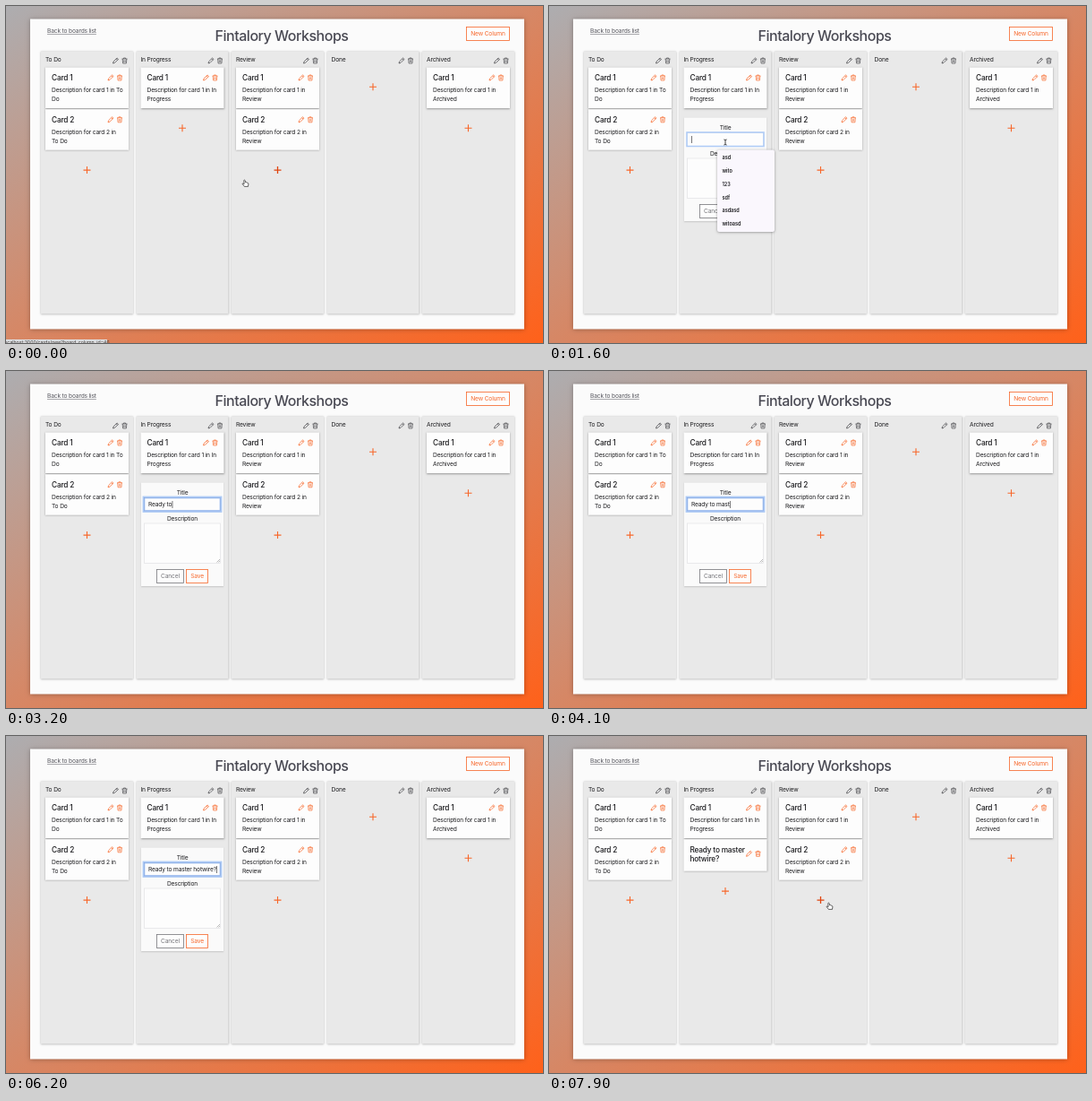
An HTML page with a canvas that plays this animation: 600 px wide and 376 px high, repeating every 8 s.

```html
<!DOCTYPE html>
<html lang="en">
<head>
<meta charset="utf-8">
<title>Board</title>
<style>
html, body { margin: 0; width: 100%; height: 100%; overflow: hidden; }
canvas { display: block; width: 600px; height: 376px; }
</style>
</head>
<body>
<canvas id="stage"></canvas>
<script>
const W = 600, H = 376, LOOP = 8000;
const ORANGE = '#f7672a', HOVER = '#e0440e', INK = '#1c1c1f', GREY = '#55555c';
const canvas = document.getElementById('stage');
const ctx = canvas.getContext('2d');
const dpr = window.devicePixelRatio || 1;
canvas.width = W * dpr;
canvas.height = H * dpr;

const PHRASE = 'Ready to master hotwire?';
const HINTS = ['asd', 'wito', '123', 'sdf', 'asdasd', 'witoasd'];
const COLUMNS = [['To Do', 2], ['In Progress', 1], ['Review', 2], ['Done', 0], ['Archived', 1]];

// Times of the story, in ms
const OPEN = 800, FOCUS = 1450, TYPE = 2100, UNHIDE = 6500, SAVE = 7100;
const MOVES = [[0, 267, 198], [100, 265, 196], [600, 197, 138], [900, 193, 136],
  [1050, 193, 137], [1350, 197, 152], [6500, 197, 152], [6950, 213, 229],
  [7200, 213, 229], [7700, 313, 190], [8000, 313, 190]];
const KEYS = [[2100, 0], [3150, 8], [5050, 18], [6100, 24]];

function track(points, t, ease) {
  let i = 1;
  while (i < points.length - 1 && t > points[i][0]) i++;
  const a = points[i - 1], b = points[i];
  let k = Math.min(1, Math.max(0, (t - a[0]) / (b[0] - a[0])));
  if (ease) k = k * k * (3 - 2 * k);
  return a.slice(1).map((v, n) => v + (b[n + 1] - v) * k);
}

function box(x, y, w, h, fill, stroke, lw = 0.7) {
  if (fill) { ctx.fillStyle = fill; ctx.fillRect(x, y, w, h); }
  if (stroke) { ctx.strokeStyle = stroke; ctx.lineWidth = lw; ctx.strokeRect(x, y, w, h); }
}

function shadowBox(x, y, w, h, fill, blur, alpha, r = 0) {
  ctx.save();
  ctx.shadowColor = `rgba(0,0,0,${alpha})`;
  ctx.shadowBlur = blur * dpr;
  ctx.shadowOffsetY = 0.5 * dpr;
  ctx.fillStyle = fill;
  ctx.beginPath();
  ctx.roundRect(x, y, w, h, r);
  ctx.fill();
  ctx.restore();
}

// y is the middle of the capitals
function text(s, x, y, size = 6.67, color = INK, weight = 400, align = 'left', track = -0.025) {
  ctx.font = `${weight} ${size}px Inter, "Liberation Sans", sans-serif`;
  ctx.letterSpacing = track * size + 'px';
  ctx.textAlign = align;
  ctx.fillStyle = color;
  ctx.fillText(s, x, y + size * 0.36);
  return ctx.measureText(s).width;
}

function path(d, x, y, stroke, lw, fill) {
  ctx.save();
  ctx.translate(x, y);
  const p = new Path2D(d);
  if (fill) { ctx.fillStyle = fill; ctx.fill(p); }
  ctx.strokeStyle = stroke;
  ctx.lineWidth = lw;
  ctx.lineJoin = 'round';
  ctx.stroke(p);
  ctx.restore();
}

function tools(x, y, color) {
  path('M-3 3 L-2.4 .9 L1.6 -3 L3 -1.6 L-1 2.4 Z M.7 -2.1 L2.1 -.7', x, y, color, 0.75);
  path('M-3 -2 H3 M-1.1 -2 V-3 H1.1 V-2 M-2.3 -2 L-1.9 3 H1.9 L2.3 -2 M-.7 -.6 V1.8 M.7 -.6 V1.8',
    x + 10, y, color, 0.7);
}

function plus(x, y, hot) {
  path('M-4 0 H4 M0 -4 V4', x, y, hot ? HOVER : ORANGE, hot ? 1.3 : 1.1);
}

function card(x, y, h, title, lines) {
  shadowBox(x + 5, y, 93, h, '#fdfdfd', 2, 0.35);
  title.forEach((s, i) => text(s, x + 12, y + 11.5 + i * 10, 8.3, INK, 500));
  lines.forEach((s, i) => text(s, x + 12, y + 25 + i * 10));
  tools(x + 78, y + 11.5 + (title.length - 1) * 4.5, ORANGE);
}

function button(s, x, y, w, h, color) {
  box(x, y, w, h, '#fdfdfd', color, 0.8);
  text(s, x + w / 2, y + h / 2, 6.67, color, 400, 'center');
}

function form(t) {
  shadowBox(151, 124.5, 92, 115.5, '#fafafa', 1.5, 0.15);
  text('Title', 197, 136, 6.67, INK, 400, 'center');
  const focused = t >= FOCUS && t < SAVE - 60;
  box(154.5, 141.5, 85, 15, '#fdfdfd', '#e2e2e4');
  if (focused) {
    const grow = Math.min(1, Math.max(0, (t - FOCUS) / 700));
    box(154, 141, 86, 15.5, null, '#aecbf6', 1.2 + 1.6 * grow);
    if (grow > 0.5) box(154.5, 141.5, 85, 14.5, null, '#7f9fdc', 0.5);
    const n = t < TYPE ? 0 : Math.floor(track(KEYS, t)[0] + 0.001);
    const w = text(PHRASE.slice(0, n), 159, 149);
    const still = t < TYPE || t > 6300;
    const since = t < TYPE ? t - FOCUS : t - 6300;
    if (!still || since % 1000 < 500) box(159.3 + (n ? w : 0), 145, 0.6, 8, INK);
  } else if (t >= FOCUS) {
    text(PHRASE, 159, 149);
  }
  text('Description', 197, 165, 6.67, INK, 400, 'center');
  box(154.5, 170, 85, 44.5, '#fdfdfd', '#e2e2e4');
  path('M-3.5 0 L0 -3.5 M-1.5 0 L0 -1.5', 239, 213.5, '#777', 0.5);
  button('Cancel', 168.5, 221.5, 30, 15, '#77777c');
  button('Save', 201.5, 221.5, 24, 15, ORANGE);
  if (t >= FOCUS + 50 && t < TYPE + 100) {
    shadowBox(188, 160.5, 64, 91.5, '#faf7fd', 3, 0.4, 2);
    HINTS.forEach((s, i) => text(s, 193.5, 169.3 + i * 14.75, 5.5, INK, 600, 'left', 0));
  }
}

function status(id) {
  box(0, 372, 113, 4, '#dcdcde');
  text('localhost:3000/cards/new?board_column_id=' + id, -3, 375.6, 5.2, '#444', 400, 'left', 0);
}

const HAND = 'M-1.2 -3.5 Q-.4 -4.3 .2 -3.3 L.6 -1.2 Q1.6 -1.7 2 -.9 Q3 -1.2 3.2 -.3 Q4 -.3 3.9 .6 L3.5 3.4 H-.6 L-2.8 .6 Q-3 -.3 -2 -.1 L-.9 .7 Z';
const ARROW = 'M0 0 V6 L1.4 4.8 L2.4 7 L3.4 6.5 L2.4 4.4 H4.2 Z';
const BEAM = 'M-1.6 -3 Q0 -3 0 -2 Q0 -3 1.6 -3 M0 -2 V2 M-1.6 3 Q0 3 0 2 Q0 3 1.6 3';

function pointer(t) {
  if (t >= TYPE && t < UNHIDE) return;
  const [x, y] = track(MOVES, t, true);
  const inInput = t > OPEN && t < SAVE && y > 141 && y < 157;
  const hand = t < OPEN || (t > 6850 && t < SAVE) || (t > 7400 && x > 252);
  if (inInput) path(BEAM, x, y, '#111', 0.8);
  else if (hand) path(HAND, x, y, '#222', 0.7, '#fff');
  else path(ARROW, x - 0.5, y - 1, '#fff', 0.5, '#000');
}

function draw(t) {
  ctx.setTransform(dpr, 0, 0, dpr, 0, 0);
  // Corner-to-corner gradient whose middle colour runs through the other two corners
  const k = W * H / (W * W + H * H);
  const dx = H * k, dy = W * k;
  const g = ctx.createLinearGradient(W / 2 - dx, H / 2 - dy, W / 2 + dx, H / 2 + dy);
  g.addColorStop(0, '#adadb0');
  g.addColorStop(1, '#ff611a');
  box(0, 0, W, H, g);

  shadowBox(27, 14.5, 552, 346, '#fbfbfb', 5, 0.3);
  const lw = text('Back to boards list', 46, 28, 6.67, GREY);
  box(46, 31.4, lw, 0.5, GREY);
  text('Fintalory Workshops', 308, 33.5, 16, '#494953', 500, 'center', -0.03);
  button('New Column', 514.5, 23.5, 48, 15, ORANGE);

  const [px] = track(MOVES, t, true);
  const saved = t >= SAVE, open = t >= OPEN && !saved;
  const hover = t < OPEN || t > 7400 ? Math.floor((px - 38.5) / 106.5) : -1;
  COLUMNS.forEach(([name, count], c) => {
    const x = 39 + c * 106.5;
    shadowBox(x, 50.5, 103, 293, '#e9e9e9', 2, 0.3);
    text(name, x + 5, 59.5);
    tools(x + 83.5, 61, '#48484c');
    let end = 68;
    for (let i = 0; i < count; i++) {
      const tail = name.split(' ');
      const first = name === 'To Do' || name === 'In Progress';
      const one = name === 'To Do' && i === 1;
      const lines = [`Description for card ${i + 1} in` + (first && !one ? ' ' + tail[0] : ''),
        first && !one ? tail[1] : name];
      const y = 68.5 + i * 46.8;
      card(x, y, 45.5, ['Card ' + (i + 1)], lines);
      end = y + 45.5;
    }
    if (c === 1 && saved) {
      card(x, 115.3, 35.5, ['Ready to master', 'hotwire?'], []);
      end = 150.8;
    }
    if (!(c === 1 && open)) plus(x + 51.5, end + 22.3, hover === c);
  });

  if (open) form(t);
  if (t < 1250) status(t < 450 ? 46 : 45);
  pointer(t);
}

function frame(now) {
  draw(now % LOOP);
  requestAnimationFrame(frame);
}
requestAnimationFrame(frame);
</script>
</body>
</html>
```
